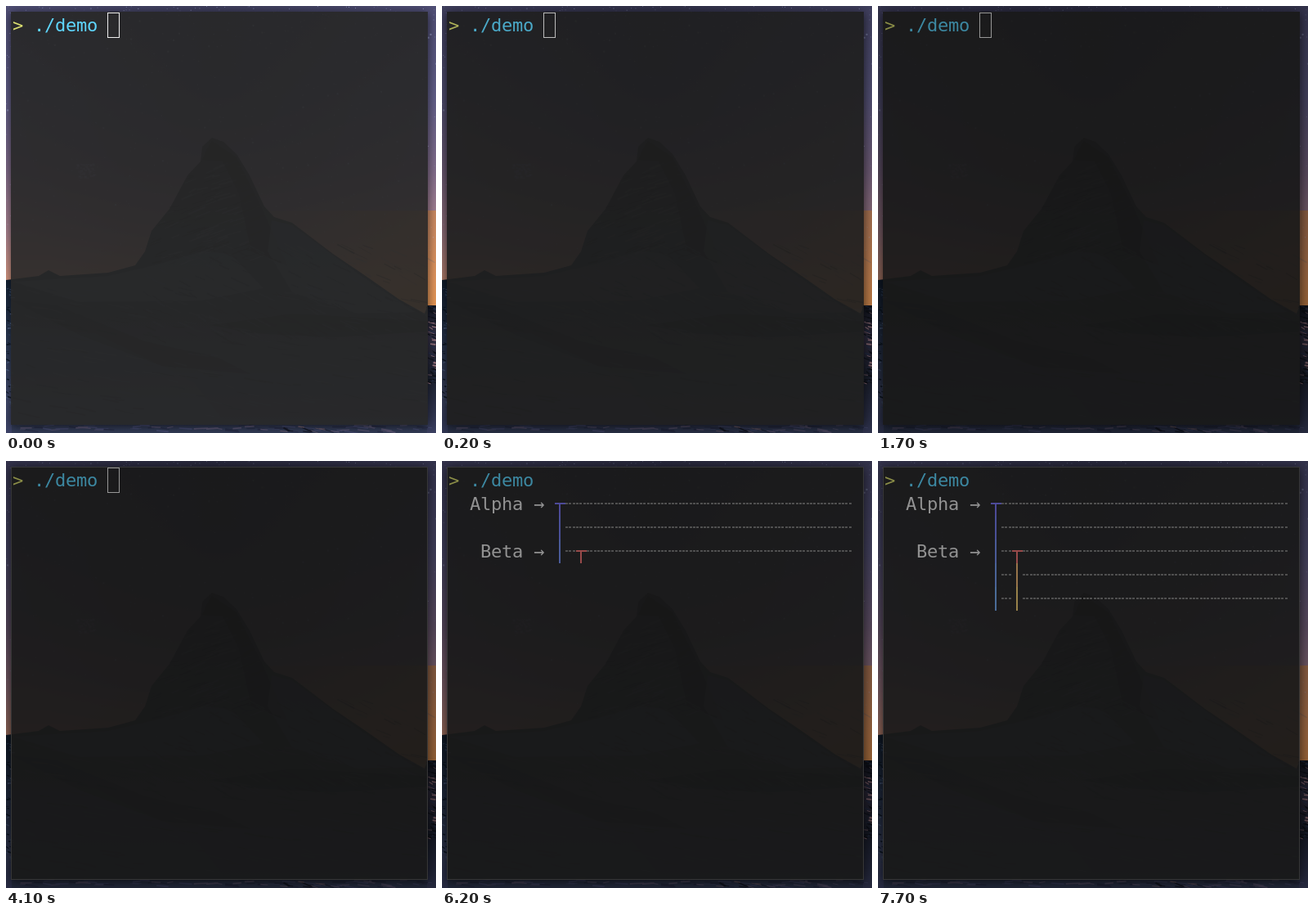
Write an HTML page with a canvas that moves like this. It is 526 px wide and 522 px high and loops after 8 s.

```html
<!DOCTYPE html>
<html lang="en">
<head>
<meta charset="utf-8">
<title>Terminal demo</title>
<style>
html, body { margin: 0; width: 100%; height: 100%; overflow: hidden; background: #111; }
canvas { display: block; }
</style>
</head>
<body>
<canvas id="stage" width="526" height="522"></canvas>
<script>
const W = 526, H = 522, LOOP = 8000;
const CELL_W = 13, CELL_H = 29, LEFT = 8, TOP = 9, COLS = 38;
const FADE = [1, 0.89, 0.79, 0.7, 0.63];
const ROW_TIMES = [4700, 5700, 6200, 7200, 7700];
const FOCUS = 4100, SOLID = 4300, BLINK = 900;

const ctx = document.getElementById('stage').getContext('2d');
const backdrop = document.createElement('canvas');
backdrop.width = W;
backdrop.height = H;

let seed = 7;
const random = () => (seed = (seed * 16807) % 2147483647) / 2147483647;
const between = (a, b) => a + random() * (b - a);

function gradient(g, x0, y0, x1, y1, stops) {
  const fill = g.createLinearGradient(x0, y0, x1, y1);
  stops.forEach(([at, color]) => fill.addColorStop(at, color));
  return fill;
}

function polygon(g, points, fill) {
  g.beginPath();
  for (let i = 0; i < points.length; i += 2) g.lineTo(points[i], points[i + 1]);
  g.closePath();
  g.fillStyle = fill;
  g.fill();
}

function streaks(g, count, [x0, y0, x1, y1], slope, length, colors) {
  for (let i = 0; i < count; i++) {
    const x = between(x0, x1), y = between(y0, y1), w = between(length / 3, length);
    g.strokeStyle = colors[i % colors.length];
    g.lineWidth = between(0.6, 2);
    g.beginPath();
    g.moveTo(x, y);
    g.lineTo(x + w, y + w * slope + between(-2, 2));
    g.stroke();
  }
}

function paintSky(g) {
  g.fillStyle = gradient(g, 0, 0, 0, 370, [
    [0, '#515078'], [0.3, '#66638f'], [0.55, '#87708f'], [0.75, '#b08794'], [0.9, '#dd9c86'], [1, '#e8a070']]);
  g.fillRect(0, 0, W, H);
  g.fillStyle = gradient(g, 250, 0, W, 0, [[0, 'rgba(230,145,65,0)'], [1, 'rgba(230,145,65,.6)']]);
  g.fillRect(250, 250, 276, 120);
  // The middle of the sky is darker than its edges.
  const shade = g.createRadialGradient(260, 90, 20, 260, 90, 300);
  shade.addColorStop(0, 'rgba(30,32,45,.45)');
  shade.addColorStop(1, 'rgba(30,32,45,0)');
  g.fillStyle = shade;
  g.fillRect(0, 0, W, 370);
  for (let i = 0; i < 750; i++) {
    const size = random() < 0.06 ? 2 : 1;
    g.fillStyle = `rgba(190,200,245,${between(0.1, 0.65)})`;
    g.fillRect(between(0, W), 300 * random() ** 1.3, size, size);
  }
  for (let i = 0; i < 60; i++) {
    g.fillStyle = 'rgba(185,180,230,.25)';
    g.fillRect(between(85, 108), between(192, 210), 3, 2);
  }
}

function paintMountain(g) {
  polygon(g, [0, 335, 40, 330, 52, 323, 66, 330, 125, 326, 158, 317, 170, 300, 178, 275,
    200, 248, 222, 207, 238, 190, 240, 172, 252, 161, 266, 166, 282, 181, 298, 207, 316, 245,
    328, 258, 350, 265, 400, 303, 440, 330, 480, 358, 512, 376, 516, 366, W, 366, W, H, 0, H],
    gradient(g, 0, 160, 0, H, [[0, '#16181f'], [0.4, '#1b2431'], [0.65, '#202b3a'], [1, '#333c58']]));

  g.save();
  g.beginPath();
  [[252, 165], [224, 208], [182, 275], [168, 315], [345, 320], [312, 245], [282, 185]]
    .forEach(([x, y]) => g.lineTo(x, y));
  g.clip();
  streaks(g, 150, [160, 195, 300, 320], -0.35, 24, ['rgba(85,95,115,.4)', 'rgba(5,7,12,.5)']);
  polygon(g, [252, 160, 282, 181, 316, 245, 350, 320, 300, 300, 285, 230, 265, 190, 240, 188],
    'rgba(5,6,10,.65)');
  g.restore();

  const snow = 'rgba(70,90,118,.4)';
  polygon(g, [8, 337, 125, 330, 185, 316, 240, 300, 275, 303, 315, 345, 240, 360, 90, 362], snow);
  polygon(g, [325, 262, 350, 268, 440, 334, 500, 374, 430, 376, 350, 350, 320, 300], snow);
  polygon(g, [0, 390, 110, 400, 230, 460, 270, 512, 0, 512], 'rgba(55,72,96,.3)');
  polygon(g, [250, 390, 350, 376, 515, 385, 515, 398, 400, 405, 300, 400], 'rgba(5,8,14,.6)');
  polygon(g, [6, 360, 60, 365, 170, 410, 260, 430, 300, 450, 190, 440, 90, 402], 'rgba(5,8,14,.45)');
  streaks(g, 170, [165, 290, 510, 400], 0.5, 22, ['rgba(8,10,16,.4)', 'rgba(90,108,135,.22)']);
  streaks(g, 190, [0, 340, 515, 500], 0.18, 28, ['rgba(6,10,16,.35)', 'rgba(90,105,130,.2)']);
}

function paintEdges(g) {
  g.fillStyle = gradient(g, 0, 335, 0, H, [[0, '#142235'], [0.4, '#2e3c58'], [0.8, '#454d70'], [1, '#3c4267']]);
  g.fillRect(0, 335, 7, 187);
  g.fillStyle = gradient(g, 0, 366, 0, H, [[0, '#111622'], [0.25, '#343044'], [0.55, '#1c2130'], [1, '#3b4062']]);
  g.fillRect(515, 366, 11, 156);
  streaks(g, 40, [0, 335, 6, 500], 0.3, 5, ['#101c2b', '#52658b', '#334766']);
  streaks(g, 65, [514, 366, 524, 460], 0.4, 8, ['#0f121b', '#9b7781', '#28304a', '#10131c']);
  streaks(g, 75, [0, 512, W, 521], 0.05, 18, ['#454a70', '#292e49', '#5a5573']);
  streaks(g, 10, [315, 513, 390, 520], 0.3, 15, ['#171a28', '#756271']);
}

function paintBackdrop(g) {
  paintSky(g);
  paintMountain(g);
  paintEdges(g);

  // Shadow outside the window only, since the window itself is translucent.
  g.save();
  g.beginPath();
  g.rect(0, 0, W, H);
  g.rect(6, 7, 510, 505);
  g.clip('evenodd');
  g.shadowColor = 'rgba(0,0,0,.65)';
  g.shadowBlur = 12;
  g.shadowOffsetY = 2;
  g.fillStyle = '#000';
  g.fillRect(6, 7, 510, 505);
  g.restore();

  g.fillStyle = 'rgba(40,40,40,.92)';
  g.fillRect(6, 7, 510, 505);
}

const colX = col => LEFT + col * CELL_W;
const rowY = row => TOP + row * CELL_H;

function write(text, col, row, color) {
  ctx.fillStyle = color;
  [...text].forEach((char, i) => ctx.fillText(char, colX(col + i), rowY(row) + 22));
}

function dashes(from, to, row) {
  ctx.fillStyle = '#7d7d7d';
  for (let i = 0; i < (to - from) * 3; i++) {
    ctx.fillRect(Math.round(colX(from) + i * CELL_W / 3), rowY(row) + 13, 3, 2);
  }
}

function branch(col, row, hue, isTop) {
  const x = colX(col), y = rowY(row);
  ctx.fillStyle = `hsl(${hue} 80% 70%)`;
  if (isTop) ctx.fillRect(x, y + 13, CELL_W, 2);
  const offset = isTop ? 13 : 0;
  ctx.fillRect(x + 5, y + offset, 2, CELL_H - offset);
}

function drawRow(row) {
  const label = { 1: 'Alpha →', 3: ' Beta →' }[row];
  if (label) write(label, 2, row, '#e6e6e6');
  branch(10, row, 249 - row * 7, row === 1);
  if (row < 3) {
    dashes(11, COLS, row);
  } else {
    dashes(11, 12, row);
    branch(12, row, [0, 33, 43][row - 3], row === 3);
    dashes(13, COLS, row);
  }
}

function drawCursor(t, rows) {
  if (t < SOLID) {
    ctx.strokeStyle = '#eee';
    ctx.lineWidth = 1;
    ctx.strokeRect(124.5, 8.5, 14, 30);
    return;
  }
  const started = t >= ROW_TIMES[0];
  if (started && Math.floor((t - ROW_TIMES[0]) / BLINK) % 2) return;
  ctx.fillStyle = '#eee';
  ctx.fillRect(colX(started ? 0 : 9), rowY(started ? rows + 1 : 0), CELL_W, CELL_H);
}

function draw(t) {
  const rows = ROW_TIMES.filter(time => t >= time).length;
  ctx.drawImage(backdrop, 0, 0);
  ctx.font = '22px "DejaVu Sans Mono", monospace';
  write('>', 0, 0, '#dce070');
  write('./demo', 2, 0, '#5fd7ff');
  for (let row = 1; row <= rows; row++) drawRow(row);
  drawCursor(t, rows);
  if (t >= FOCUS) {
    ctx.strokeStyle = '#555';
    ctx.lineWidth = 1;
    ctx.strokeRect(6.5, 7.5, 509, 504);
  }
  const level = FADE[Math.min(4, Math.floor(t / 100))];
  ctx.fillStyle = `rgba(0,0,0,${1 - level})`;
  ctx.fillRect(0, 0, W, H);
}

paintBackdrop(backdrop.getContext('2d'));
const start = performance.now();
function tick() {
  draw((performance.now() - start) % LOOP);
  requestAnimationFrame(tick);
}
tick();
</script>
</body>
</html>
```
